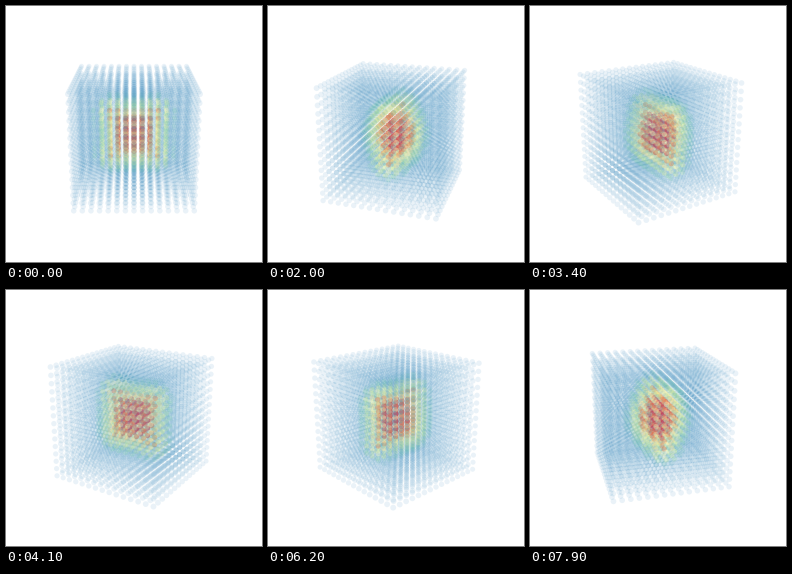
Animation of 256x256 px, one loop 8000 ms. Source, as a matplotlib script:

```python
import numpy as np
import matplotlib.pyplot as plt
from matplotlib.animation import FuncAnimation

SIZE, DPI = 256, 100
FRAMES, INTERVAL = 80, 100
STEP = np.radians(3.6)      # turn per frame
ELEV = np.radians(20)
CX, CY = 128, 127.5
HALF = 56.1                 # half side of the cube in pixels
DIST = 8.62                 # camera distance in half sides
RADIUS = 2.6
N = 15

axis = np.linspace(-1, 1, N)
X, Y, Z = (g.ravel() for g in np.meshgrid(axis, axis, axis))


def density(x, y, z):
    """Round core with four lobes in the x-z plane."""
    core = np.exp(-(x ** 2 + z ** 2) / 0.25 - y ** 2 / 0.18)
    corner = (np.abs(x) - 0.45) ** 2 + (np.abs(z) - 0.45) ** 2 + y ** 2
    return core + 0.35 * np.exp(-corner / 0.06)


def point_colors(v):
    """Blue and faint outside, red and dense in the core."""
    t = np.clip((v - 0.1) / 0.6, 0, 1)
    rgba = plt.colormaps["Spectral_r"](0.1 + 0.8 * t)
    rgba[:, 3] = 0.1 + 0.5 * t ** 0.6
    return rgba


def project(angle):
    """Screen x, y, perspective scale and depth of every point."""
    c, s = np.cos(angle), np.sin(angle)
    right = X * c + Y * s
    near = Y * c - X * s
    up = Z * np.cos(ELEV) - near * np.sin(ELEV)
    depth = near * np.cos(ELEV) + Z * np.sin(ELEV)
    scale = DIST / (DIST - depth)
    return CX + HALF * right * scale, CY - HALF * up * scale, scale, depth


fig = plt.figure(figsize=(SIZE / DPI, SIZE / DPI), dpi=DPI, facecolor="white")
ax = fig.add_axes([0, 0, 1, 1])
ax.set_xlim(0, SIZE)
ax.set_ylim(SIZE, 0)
ax.axis("off")
dots = ax.scatter(X, Y, s=1, linewidths=0)
colors = point_colors(density(X, Y, Z))


def update(i):
    px, py, scale, depth = project(i * STEP)
    order = np.argsort(depth, kind="stable")
    dots.set_offsets(np.column_stack([px, py])[order])
    dots.set_facecolors(colors[order])
    dots.set_sizes((2 * RADIUS * scale[order] * 72 / DPI) ** 2)
    return (dots,)


anim = FuncAnimation(fig, update, frames=FRAMES, interval=INTERVAL,
                     repeat=True, repeat_delay=0)
plt.show()
```
